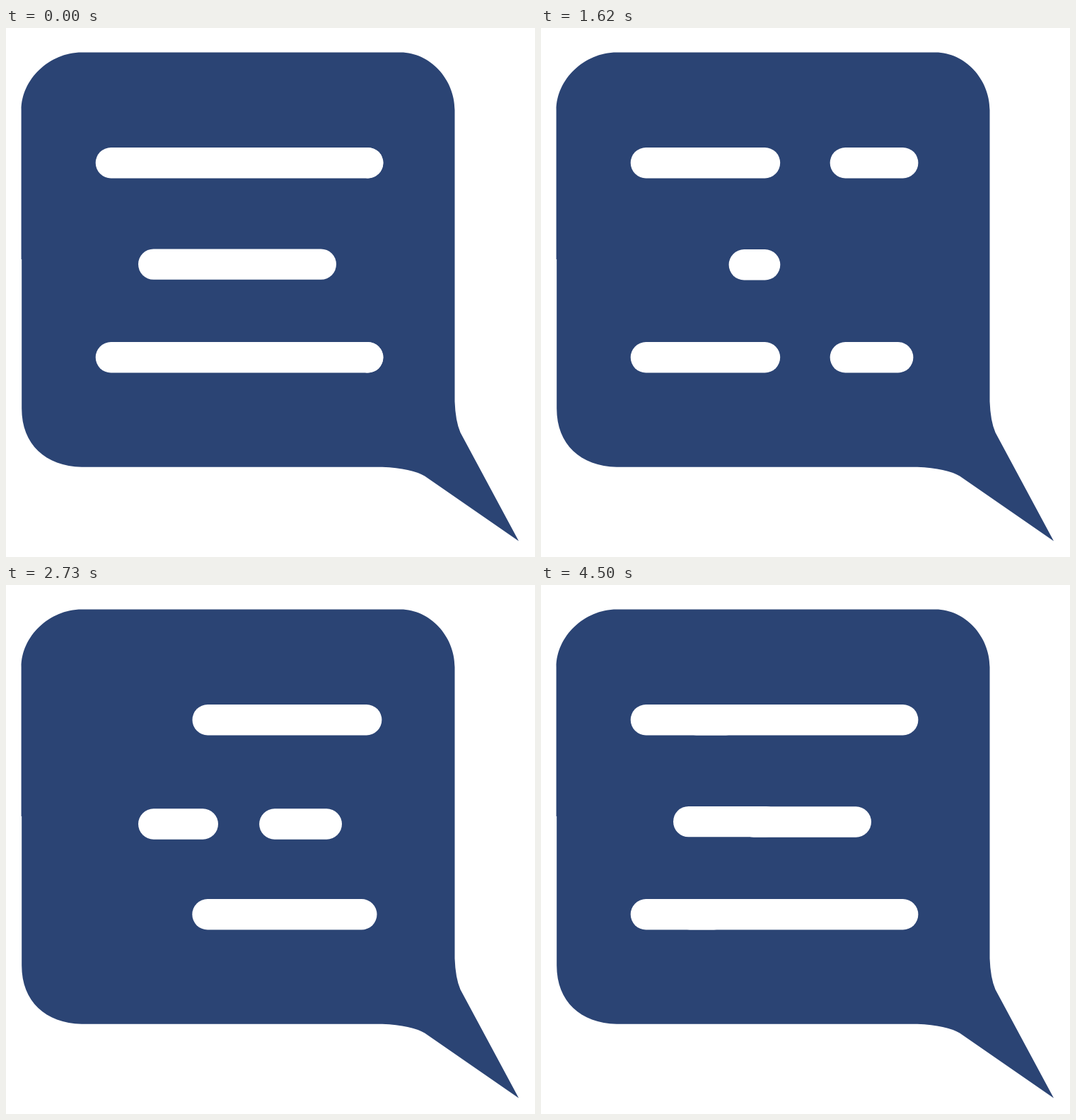
Animation of 748 by 748 pixels, one loop 4.53 s. Source, as an HTML page:

```html
<!DOCTYPE html>
<html lang="en">
<head>
<meta charset="utf-8">
<title>Speech bubble</title>
<style>
  html, body { margin: 0; width: 100%; height: 100%; overflow: hidden; background: #fff; }
  svg { display: block; width: 100%; height: 100%; }
  .bubble { fill: #2b4474; }
  rect { fill: #fff; }
</style>
</head>
<body>
<svg viewBox="0 0 748 748">
  <path class="bubble" d="M107 34.5H558C599 34.5 634.5 72 634.5 116V528Q635.5 556 642.5 572L725 725.6L592 633.6
    Q574 622.6 532 620.7H107C56 619.5 22.2 589 22.2 538V327H21.6V116C21.6 73 61 34.5 107 34.5Z"/>
  <g id="pills"></g>
</svg>
<script>
const LOOP = 4530, STEP = 30, SIZE = 43.4;
const LEFT = 126.7, RIGHT = 533.4;

const clamp = u => Math.min(1, Math.max(0, u));
const span = (t, from, to) => clamp((t - from) / (to - from));
const mix = (a, b, u) => a + (b - a) * u;
const dash = (u, k, n) => k * u + (1 - k) * u ** n;   // steady, then a late rush
const settle = (u, n) => 1 - (1 - u) ** n;

// Outer row: one pill shrinks to the left while another grows from the right,
// then a new one grows from the left. lag pulls the right end in between.
function outerRow(y, lag, grownLeft, grownRight) {
  const growerLeft = t => t <= 2700
    ? mix(490, 267, dash(t / 2700, .5, 4))
    : mix(265, grownLeft, settle(span(t, 2700, 4500), 1.35));
  const growerRight = t => RIGHT
    - 44 * clamp(Math.min((t - 2700) / 650, (4500 - t) / 1150))
    - lag * clamp(Math.min(t / 900, (4500 - t) / 1800));
  return [
    { until: 2700, y: () => y, left: () => LEFT,
      right: t => mix(RIGHT, 173, dash(t / 2700, .9, 8)) },
    { y: () => y, left: growerLeft, right: growerRight },
    { from: 3500, y: () => y, left: t => LEFT + .0073 * (4500 - t),
      right: t => mix(177.5, grownRight, span(t, 3500, 4500) ** 1.6) }
  ];
}

// Middle row: one pill narrows, swings back left and is joined by a second one.
function middleRow() {
  const y = t => 334.1 + 3.9 * clamp(Math.min((t - 1400) / 1200, (4600 - t) / 800));
  return [
    { y,
      left: t => 187 + 87 * clamp(Math.min((t / 1840) ** .8, (2380 - t) / 540)),
      right: t => Math.max(467 - .084 * t, 395 - .035 * t, 300, 302 + .053 * (t - 3780)) },
    { from: 2250, y: t => y(t) + .4 * span(t, 2730, 3780),
      left: t => mix(432, 279, settle(span(t, 2250, 4500), 2.75)),
      right: t => mix(475, 467, span(t, 2730, 3780)) }
  ];
}

const group = document.getElementById('pills');
const pills = [
  ...outerRow(190.7, 0, 198, 283),
  ...middleRow(),
  ...outerRow(465.8, 7, 189, 266)
].map(pill => {
  const el = document.createElementNS('http://www.w3.org/2000/svg', 'rect');
  el.setAttribute('height', SIZE);
  el.setAttribute('rx', SIZE / 2);
  group.append(el);
  return { from: 0, until: LOOP, ...pill, el };
});

function draw(now) {
  const t = Math.floor(now % LOOP / STEP) * STEP;
  for (const { el, from, until, left, right, y } of pills) {
    const shown = t >= from && t <= until;
    el.style.display = shown ? '' : 'none';
    if (!shown) continue;
    const x = left(t);
    el.setAttribute('x', x);
    el.setAttribute('y', y(t) - SIZE / 2);
    el.setAttribute('width', right(t) - x);
  }
}

const start = performance.now();
function tick() {
  draw(performance.now() - start);
  requestAnimationFrame(tick);
}
tick();
</script>
</body>
</html>
```
